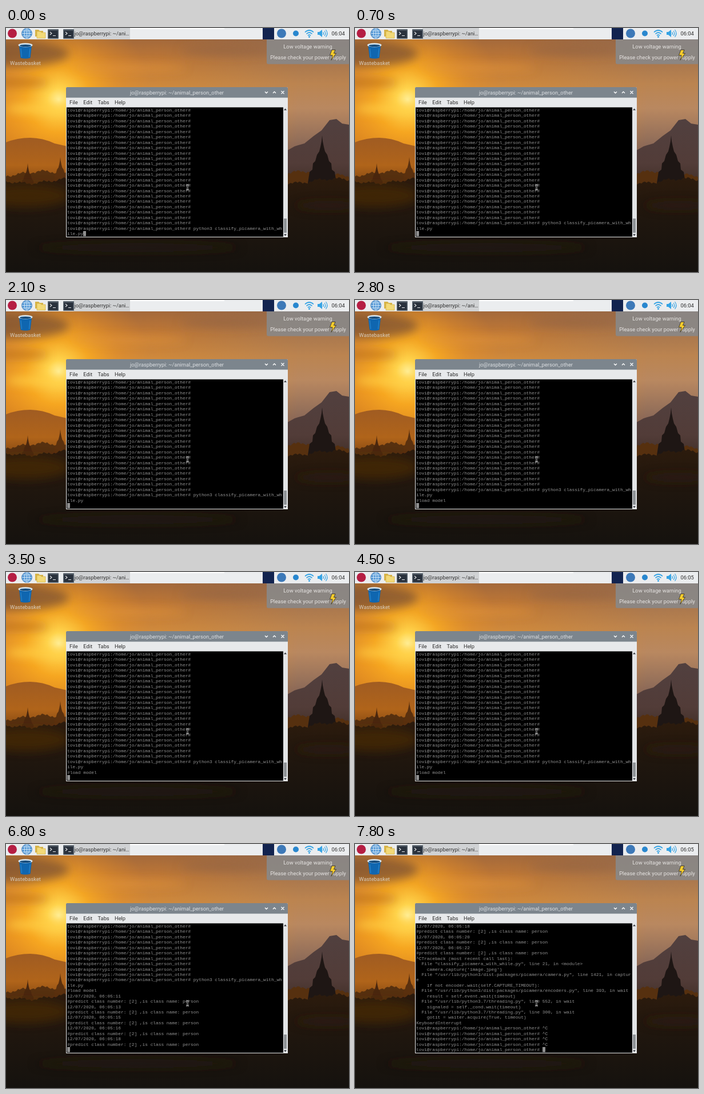
An HTML page for the animation above (7.9 s loop, 600 px wide and 429 px high).

```html
<!DOCTYPE html>
<html lang="en">
<head>
<meta charset="utf-8">
<title>Terminal session</title>
<style>
html, body { margin: 0; width: 100%; height: 100%; overflow: hidden; background: #17130f; }
svg { position: absolute; left: 0; top: 0; font: 9.33px Roboto, sans-serif; }
#term {
  position: absolute; left: 107px; top: 140px; width: 377px; height: 227px; overflow: hidden;
  color: #939393; font: 7.833px/9.43px "Liberation Mono", monospace;
}
pre { margin: 0; font: inherit; }
#caret { position: absolute; width: 4.7px; height: 9.4px; background: #8f8f8f; }
#pointer { z-index: 1; }
</style>
</head>
<body>
<svg width="600" height="429" viewBox="0 0 600 429">
  <defs>
    <linearGradient id="sky" x2="0" y2="1">
      <stop offset=".06" stop-color="#a2683b"/>
      <stop offset=".2" stop-color="#bf7836"/>
      <stop offset=".36" stop-color="#d08a3c"/>
      <stop offset=".55" stop-color="#e08c24"/>
      <stop offset="1" stop-color="#b0651c"/>
    </linearGradient>
    <linearGradient id="east" gradientUnits="userSpaceOnUse" x1="0" y1="20" x2="0" y2="215">
      <stop offset="0" stop-color="#96694a"/>
      <stop offset=".4" stop-color="#bb8450"/>
      <stop offset=".62" stop-color="#b98860"/>
      <stop offset="1" stop-color="#866657"/>
    </linearGradient>
    <linearGradient id="fade"><stop offset=".45" stop-color="#000"/><stop offset=".85" stop-color="#fff"/></linearGradient>
    <mask id="right"><rect width="600" height="290" fill="url(#fade)"/></mask>
    <radialGradient id="sun" gradientUnits="userSpaceOnUse" cx="92" cy="126" r="165">
      <stop offset="0" stop-color="#fff09a"/>
      <stop offset=".12" stop-color="#ffd44c"/>
      <stop offset=".35" stop-color="#fbac20" stop-opacity=".85"/>
      <stop offset=".7" stop-color="#ee9420" stop-opacity=".35"/>
      <stop offset="1" stop-color="#e68c22" stop-opacity="0"/>
    </radialGradient>
    <linearGradient id="hillL" x2="0" y2="1">
      <stop offset="0" stop-color="#a05c22"/>
      <stop offset=".5" stop-color="#b0641a"/>
      <stop offset="1" stop-color="#6e3a0e"/>
    </linearGradient>
    <linearGradient id="hillR" x2="0" y2="1">
      <stop offset="0" stop-color="#51403f"/>
      <stop offset=".6" stop-color="#523c38"/>
      <stop offset="1" stop-color="#3a2a22"/>
    </linearGradient>
    <linearGradient id="land" x2="0" y2="1">
      <stop offset="0" stop-color="#2c1b0d"/>
      <stop offset=".45" stop-color="#1f160e"/>
      <stop offset="1" stop-color="#15120e"/>
    </linearGradient>
    <filter id="soft" x="-30%" y="-80%" width="160%" height="260%"><feGaussianBlur stdDeviation="8"/></filter>
    <path id="pagoda" d="M0 0L1 10 3 20 5 28 9 34 12 45 16 49 17 60 22 64 25 84H-25L-22 64-17 60-16 49-12 45-9 34-5 28-3 20-1 10Z"/>
    <g id="shell">
      <rect width="19" height="17" rx="1" fill="#59636d"/>
      <rect x="1.5" y="2.5" width="16" height="13" fill="#29313c"/>
      <path d="M4 5l3 2.5L4 10M9 11.5h5" fill="none" stroke="#e8eaec" stroke-width="1.1"/>
    </g>
  </defs>

  <!-- evening landscape -->
  <rect width="600" height="290" fill="url(#sky)"/>
  <rect width="600" height="290" fill="url(#east)" mask="url(#right)"/>
  <rect width="600" height="290" fill="url(#sun)"/>
  <g filter="url(#soft)">
    <ellipse cx="20" cy="45" rx="90" ry="22" fill="#7d5232" opacity=".75"/>
    <ellipse cx="20" cy="96" rx="55" ry="8" fill="#b4681d" opacity=".6"/>
    <ellipse cx="60" cy="142" rx="60" ry="8" fill="#ffcf45" opacity=".8"/>
    <ellipse cx="215" cy="70" rx="100" ry="7" fill="#e6983c" opacity=".55"/>
    <ellipse cx="385" cy="40" rx="80" ry="9" fill="#8f6042" opacity=".5"/>
  </g>
  <path d="M0 201Q20 193 42 193T85 203L120 211V290H0Z" fill="url(#hillL)"/>
  <path d="M480 222L505 208 522 203 538 190 552 180 566 162 578 160 588 168 600 170V290H480Z" fill="url(#hillR)"/>
  <path id="far" fill="#56300f"/>
  <use href="#pagoda" transform="translate(38 238) scale(.62)" fill="#4a270e"/>
  <use href="#pagoda" transform="translate(95 227) scale(.65)" fill="#5a300e"/>
  <use href="#pagoda" transform="translate(553 189)" fill="#1e1614"/>
  <path id="near" fill="url(#land)"/>
  <g filter="url(#soft)">
    <ellipse cx="35" cy="295" rx="75" ry="20" fill="#543008" opacity=".55"/>
    <ellipse cx="565" cy="312" rx="60" ry="8" fill="#33251a" opacity=".5"/>
    <ellipse cx="230" cy="386" rx="180" ry="8" fill="#2a2015" opacity=".5"/>
  </g>

  <!-- desktop -->
  <path d="M23 31L25.500 52.500Q34 55 42.500 52.500L45 31Z" fill="#0f66b0"/>
  <path d="M26 36l1.500 15M42 36l-1.500 15" stroke="#2b86cc" stroke-width="1.2"/>
  <ellipse cx="34" cy="30" rx="12.500" ry="3.600" fill="#d9e8f2"/>
  <ellipse cx="34" cy="31" rx="10" ry="2" fill="#174d7d"/>
  <text x="34" y="65.300" text-anchor="middle" fill="#d6cbbd">Wastebasket</text>

  <!-- panel -->
  <rect width="600" height="20" fill="#ebedef"/>
  <rect x="118" width="99" height="20" fill="#d0d2d4"/>
  <path d="M217 1H382" stroke="#fff" stroke-width="2"/>
  <circle cx="11" cy="9.500" r="8" fill="#b51e43"/>
  <g fill="none" stroke="#e4f2fc" stroke-width=".8">
    <circle cx="36.500" cy="9.500" r="9" fill="#599bd7" stroke="#3b78b4"/>
    <ellipse cx="36.500" cy="9.500" rx="4.200" ry="8.500"/>
    <path d="M28 9.500h17M36.500 1v17M29.500 5h14M29.500 14h14"/>
  </g>
  <path d="M51 3h6l2 2h6v10H51Z" fill="#d7b448"/>
  <path d="M54 6h6l2 2h7v10H54Z" fill="#f2d978" stroke="#d0ad45" stroke-width=".7"/>
  <use href="#shell" x="73" y="2"/>
  <use href="#shell" x="100" y="2"/>
  <text x="119.500" y="13" fill="#333">jo@raspberrypi: ~/ani…</text>
  <rect x="449" width="20" height="20" fill="#12234f"/>
  <circle cx="482" cy="9.500" r="8" fill="#3d79b8"/>
  <circle cx="507" cy="9.500" r="5" fill="#2987cf"/>
  <g fill="none" stroke="#35a3e4" stroke-width="1.700">
    <path d="M523 7.500Q530.500 .5 538 7.500M525.500 10.500Q530.500 5.500 535.500 10.500M528 13.300Q530.500 11 533 13.300"/>
    <path d="M554.500 7q2 2.500 0 5M557 5q3.500 4.500 0 9M559.500 3q5 6.500 0 13" stroke-width="1.100"/>
  </g>
  <circle cx="530.500" cy="15.500" r="1.500" fill="#35a3e4"/>
  <path d="M545 7h3l5-4v13l-5-4h-3Z" fill="#35a3e4"/>
  <text id="clock" x="569.500" y="13" fill="#2e2e2e">06:04</text>

  <!-- notification -->
  <path d="M456 20H600V63.500H459Q456 63.500 456 60.500Z" fill="#8b8785" opacity=".95"/>
  <g fill="#e6e4e2" text-anchor="middle">
    <text x="528" y="36">Low voltage warning</text>
    <text x="528.500" y="54.500">Please check your power supply</text>
  </g>
  <path d="M570 38.500h6l-2.500 6h4L569 56.500l2-8.500h-4.500Z" fill="#f8cd2d" stroke="#3b3527" stroke-width=".9"/>

  <!-- window -->
  <path d="M105 368V106q0-2 2-2h384q2 0 2 2v262Z" fill="#e7e9eb"/>
  <path d="M105 122.500V106q0-2 2-2h384q2 0 2 2v16.500Z" fill="#7c858d"/>
  <text x="299" y="117" text-anchor="middle" fill="#dcdfe2">jo@raspberrypi: ~/animal_person_other</text>
  <path d="M453 112l2.500 2.500L458 112M467 114.500l2.500-2.500 2.500 2.500M481.500 110.800l5 5m0-5l-5 5" fill="none" stroke="#fff" stroke-width="1.300"/>
  <g fill="#2f2f2f">
    <text x="111" y="133.500">File</text><text x="135.300" y="133.500">Edit</text>
    <text x="160.500" y="133.500">Tabs</text><text x="190" y="133.500">Help</text>
  </g>
  <rect x="106" y="139.500" width="379" height="227.500"/>
  <rect x="485" y="139.500" width="7.500" height="227.500" fill="#e3e5e7"/>
  <rect x="486" y="335" width="5" height="25" fill="#8e9295"/>
  <path d="M486 144.500l2.500-3 2.500 3ZM486 362.500l2.500 3 2.500-3Z" fill="#30343a"/>
</svg>

<div id="term"><div id="caret"></div><pre id="screen"></pre></div>

<svg id="pointer" width="600" height="429" viewBox="0 0 600 429" fill="none">
  <path d="M315 275.500q2.500 0 2.500 2v5q0 2-2.500 2M320 275.500q-2.500 0-2.500 2v5q0 2 2.500 2" stroke="#eee" stroke-width="2"/>
  <path d="M315 275.500q2.500 0 2.500 2v5q0 2-2.500 2M320 275.500q-2.500 0-2.500 2v5q0 2 2.500 2" stroke="#111" stroke-width=".8"/>
</svg>

<script>
const LOOP = 7900, COLS = 80, ROWS = 24, CHAR = 4.7, LINE = 9.43;
const $ = id => document.getElementById(id);

// Uneven tree line from a few overlaid waves
function treeLine(id, base, size, phase) {
  let d = "M0 429";
  for (let x = 0; x <= 600; x += 3) {
    const y = base + size * (Math.sin(x * .041 + phase) + .5 * Math.sin(x * .17) + .35 * Math.sin(x * .73 + phase));
    d += `L${x} ${y.toFixed(1)}`;
  }
  $(id).setAttribute("d", d + "V429Z");
}
treeLine("far", 256, 4, 2);
treeLine("near", 269, 4, 0);

const prompt = "tovi@raspberrypi:/home/jo/animal_person_other# ";
const result = sec => `12/07/2020, 06:05:${sec}\n#predict class number: [2] ,is class name: person\n`;
const traceback = `^CTraceback (most recent call last):
  File "classify_picamera_with_while.py", line 21, in <module>
    camera.capture('image.jpeg')
  File "/usr/lib/python3/dist-packages/picamera/camera.py", line 1421, in capture
    if not encoder.wait(self.CAPTURE_TIMEOUT):
  File "/usr/lib/python3/dist-packages/picamera/encoders.py", line 393, in wait
    result = self.event.wait(timeout)
  File "/usr/lib/python3.7/threading.py", line 552, in wait
    signaled = self._cond.wait(timeout)
  File "/usr/lib/python3.7/threading.py", line 300, in wait
    gotit = waiter.acquire(True, timeout)
KeyboardInterrupt
`;
const output = [
  [0, (prompt + "\n").repeat(22) + prompt + "python3 classify_picamera_with_while.py"],
  [700, "\n"],
  [2800, "#load model\n"],
  [5400, result(11)],
  [5700, result(13)],
  [6000, result(15)],
  [6200, result(16)],
  [6600, result(18)],
  [6900, result(20)],
  [7200, result(22)],
  [7400, traceback + prompt],
  ...[7500, 7600, 7700, 7800].map(t => [t - 20, "^C\n" + prompt])
];

function wrap(line) {
  const parts = [];
  do {
    parts.push(line.slice(0, COLS));
    line = line.slice(COLS);
  } while (line);
  return parts;
}

let shown = 0;
function draw(t) {
  $("clock").textContent = t < 3600 ? "06:04" : "06:05";
  const done = output.filter(([at]) => at <= t);
  if (done.length === shown) return;
  shown = done.length;
  const text = done.map(([, s]) => s).join("");
  const rows = text.split("\n").flatMap(wrap).slice(-ROWS);
  $("screen").textContent = rows.join("\n");
  $("caret").style.left = rows.at(-1).length * CHAR + "px";
  $("caret").style.top = (rows.length - 1) * LINE + "px";
}

const start = performance.now();
function tick() {
  draw((performance.now() - start) % LOOP);
  requestAnimationFrame(tick);
}
tick();
</script>
</body>
</html>
```
